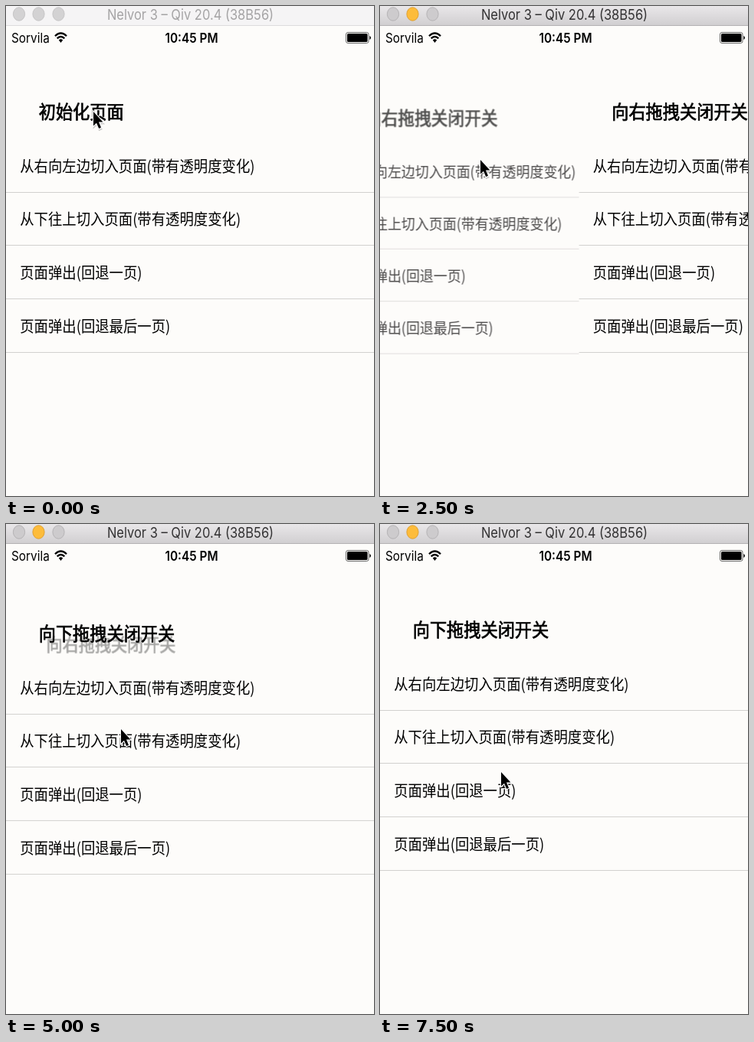
Recreate the animation shown at these times as an HTML page. Size 480 px wide and 640 px high, loop 8000 ms.

```html
<!DOCTYPE html>
<html lang="zh-CN">
<head>
<meta charset="utf-8">
<title>Page transitions</title>
<style>
  html, body { margin: 0; width: 100%; height: 100%; overflow: hidden; background: #fdfcfa; }
  svg { display: block; width: 100vw; height: 100vh; }
  .ui { font-family: Inter, Roboto, sans-serif; }
  .page { font-family: "Noto Sans CJK SC", "Noto Sans CJK", "Noto Sans CJK JP", sans-serif; }
  .heading { stroke: #000; stroke-width: .75; }
</style>
</head>
<body>
<svg id="stage" viewBox="0 0 480 640">
  <defs>
    <linearGradient id="chrome" x2="0" y2="1">
      <stop offset="0" stop-color="#e9e7e9"/>
      <stop offset="1" stop-color="#d0ced0"/>
    </linearGradient>
  </defs>
</svg>
<script>
const LOOP = 8000, STEP = 500;
const WIDTH = 480, PAGE_HEIGHT = 984, PAGE_CENTER = 518;
const LATIN_ASPECT = 0.868, HAN_ASPECT = 0.91;
const PUSH_TIME = 578;
const PAPER = "#fdfcfa";

const HOME = "初始化页面", RIGHT = "向右拖拽关闭开关", DOWN = "向下拖拽关闭开关";
const ROWS = [
  "从右向左边切入页面(带有透明度变化)",
  "从下往上切入页面(带有透明度变化)",
  "页面弹出(回退一页)",
  "页面弹出(回退最后一页)"
];

const PUSHES = [
  { start: 1118, axis: "x", from: HOME, to: RIGHT },
  { start: 2226, axis: "x", from: RIGHT, to: RIGHT },
  { start: 3017, axis: "x", from: RIGHT, to: RIGHT },
  { start: 4448, axis: "y", from: RIGHT, to: DOWN },
  { start: 6248, axis: "y", from: DOWN, to: DOWN }
];

const CURSOR_MOVES = [
  { start: 0, end: 1000, from: [114, 138], to: [131, 201] },
  { start: 4050, end: 4400, from: [131, 201], to: [150, 268] },
  { start: 7050, end: 7450, from: [150, 268], to: [158, 324] }
];

const stage = document.getElementById("stage");

function add(parent, tag, attrs = {}) {
  const node = document.createElementNS("http://www.w3.org/2000/svg", tag);
  set(node, attrs);
  parent.append(node);
  return node;
}

function set(node, attrs) {
  for (const key in attrs) node.setAttribute(key, attrs[key]);
}

function label(parent, text, x, y, size, aspect, attrs = {}) {
  const node = add(parent, "text", {
    transform: `translate(${x} ${y}) scale(${aspect} 1)`, "font-size": size, ...attrs
  });
  node.textContent = text;
  return node;
}

function makePage() {
  const group = add(stage, "g", { class: "page" });
  add(group, "rect", { y: 174, width: WIDTH, height: PAGE_HEIGHT, fill: PAPER });
  const heading = label(group, "", 42.7, 147, 24.4, HAN_ASPECT, { class: "heading" });
  ROWS.forEach((text, i) => {
    const bottom = 243 + i * 69.67;
    label(group, text, 18.2, bottom - 26.4, 20.2, HAN_ASPECT);
    add(group, "rect", { y: Math.floor(bottom), width: WIDTH, height: 1, fill: "#d2d1cf" });
  });
  return { group, heading };
}

function makeStatusBar() {
  const bar = add(stage, "g", { class: "ui" });
  label(bar, "Sorvila", 7, 48, 17.7, LATIN_ASPECT);
  label(bar, "10:45 PM", 242, 48, 17.7, LATIN_ASPECT, { "font-weight": 600, "text-anchor": "middle" });

  const wifi = add(bar, "g", { fill: "none", stroke: "#000", "stroke-width": 2.3 });
  add(wifi, "path", { d: "M64 39.2Q71.5 31.8 79 39.2M66.7 42.4Q71.5 37.6 76.3 42.4" });
  add(wifi, "path", { d: "M68.8 44.6Q71.5 42 74.2 44.6L71.5 48Z", fill: "#000", stroke: "none" });

  add(bar, "rect", { x: 443.5, y: 34.5, width: 29.5, height: 14, rx: 2.5, fill: "none", stroke: "#444", "stroke-width": 0.8 });
  add(bar, "rect", { x: 445, y: 36, width: 26.5, height: 11, rx: 1.5 });
  add(bar, "path", { d: "M474.3 39q1.7 .6 1.7 2.5t-1.7 2.5z" });
}

function makeTitleBar() {
  const bar = add(stage, "g", { class: "ui" });
  const back = add(bar, "rect", { width: WIDTH, height: 26 });
  const edge = add(bar, "rect", { y: 25, width: WIDTH, height: 1 });
  const lights = [17, 42.5, 68.5].map(cx =>
    add(bar, "ellipse", { cx, cy: 10.5, rx: 7.6, ry: 8.7 }));
  const title = label(bar, "Nelvor 3 – Qiv 20.4 (38B56)", 240.5, 18, 19, LATIN_ASPECT, { "text-anchor": "middle" });

  return active => {
    set(back, { fill: active ? "url(#chrome)" : "#f5f4f5" });
    set(edge, { fill: active ? "#b3b1b3" : "#dddcdd" });
    set(title, { fill: active ? "#343334" : "#a5a4a5" });
    lights.forEach((light, i) => set(light, active && i === 1
      ? { fill: "#fdbc3b", stroke: "#dfa032" }
      : { fill: active ? "#cdcbcd" : "#d3d2d3", stroke: active ? "#b5b3b5" : "#c6c5c6" }));
  };
}

function makeCursor() {
  const d = "M0 0V18.5L4 14.7L7.2 22L10 20.7L7 13.6H12.4Z";
  const cursor = add(stage, "g");
  add(cursor, "path", { d, transform: "translate(.5 2)", opacity: 0.18, stroke: "#000", "stroke-width": 2 });
  add(cursor, "path", { d, stroke: "#fff", "stroke-width": 2.2, "paint-order": "stroke" });
  return cursor;
}

const under = makePage();
const over = makePage();
makeStatusBar();
const setActive = makeTitleBar();
const cursor = makeCursor();

const clamp = v => Math.min(1, Math.max(0, v));
const ease = u => (1 - Math.cos(Math.PI * u)) / 2;

function drawPages(t) {
  const push = PUSHES.filter(p => t >= p.start).pop();
  const u = push ? clamp((t - push.start) / PUSH_TIME) : 1;
  const p = ease(u);
  const sideways = push && push.axis === "x";
  const dx = sideways ? (1 - p) * WIDTH : 0;
  const dy = sideways ? 0 : (1 - p) * PAGE_HEIGHT;

  over.heading.textContent = push ? push.to : HOME;
  set(over.group, { transform: `translate(${dx} ${dy})` });

  set(under.group, { visibility: u < 1 ? "visible" : "hidden" });
  if (u === 1) return;
  const scale = 1 - 0.05 * p;
  const drift = sideways ? -0.305 * WIDTH * p : 0;
  under.heading.textContent = push.from;
  set(under.group, {
    opacity: 1 - 0.65 * p,
    transform: `translate(${WIDTH / 2 + drift} ${PAGE_CENTER}) scale(${scale}) translate(${-WIDTH / 2} ${-PAGE_CENTER})`
  });
}

function drawCursor(t) {
  const move = CURSOR_MOVES.filter(m => t >= m.start).pop();
  const k = ease(clamp((t - move.start) / (move.end - move.start)));
  const [x, y] = move.from.map((a, i) => a + (move.to[i] - a) * k);
  set(cursor, { transform: `translate(${x} ${y})` });
}

function draw(time) {
  const t = Math.floor((time % LOOP) / STEP) * STEP;
  setActive(t >= 500);
  drawPages(t);
  drawCursor(t);
}

const begin = performance.now();
function tick() {
  draw(performance.now() - begin);
  requestAnimationFrame(tick);
}
tick();
</script>
</body>
</html>
```
